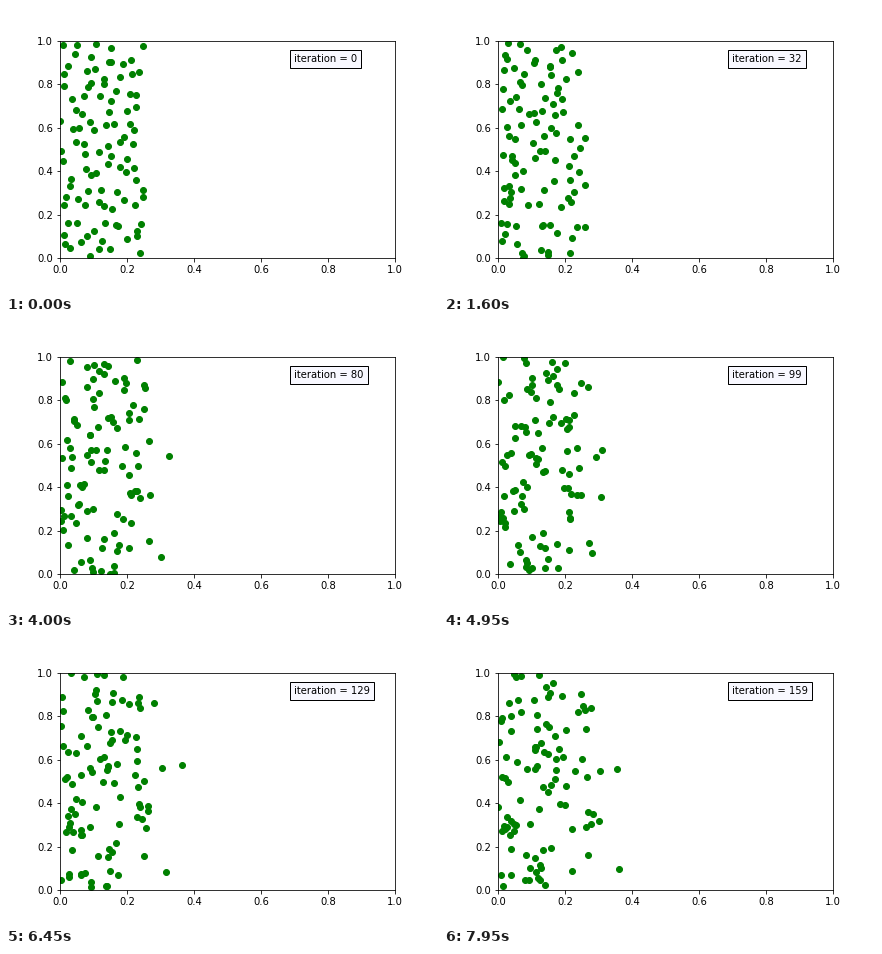
Recreate the animation shown at these times as a matplotlib script. Size 432 by 288 pixels, loop 8 s.

```python
import numpy as np
import matplotlib.pyplot as plt
from matplotlib.animation import FuncAnimation

FRAMES, INTERVAL = 160, 50
COLS, ROWS = 5, 20
START_WIDTH, REACH = 0.25, 0.385
STEP = 0.005


def fold(values, limit):
    """Reflect values back into the range 0..limit."""
    return limit - np.abs(limit - np.mod(values, 2 * limit))


def scatter_start(rng):
    """One random particle in each cell of a grid over the left strip."""
    col, row = np.meshgrid(np.arange(COLS), np.arange(ROWS))
    cells = np.stack([col.ravel(), row.ravel()], axis=1)
    cells = (cells + rng.random(cells.shape)) / (COLS, ROWS)
    return cells * (START_WIDTH, 1)


def diffuse(rng, start):
    """Random walks, shaped (frame, particle, axis)."""
    steps = rng.normal(0, STEP, (FRAMES, *start.shape))
    steps[0] = 0
    return fold(start + np.cumsum(steps, axis=0), np.array([REACH, 1]))


rng = np.random.default_rng(7)
paths = diffuse(rng, scatter_start(rng))

fig = plt.figure(figsize=(6, 4), dpi=72, facecolor="white")
fig.subplots_adjust(left=0.125, right=0.9, bottom=0.125, top=0.88)
ax = fig.add_subplot(xlim=(0, 1), ylim=(0, 1))
dots, = ax.plot([], [], "o", color="green", markersize=6)
label = ax.text(0.7, 0.9, "", fontsize=10,
                bbox=dict(facecolor="ghostwhite", edgecolor="black"))


def update(frame):
    dots.set_data(*paths[frame].T)
    label.set_text(f"iteration = {frame}")
    return dots, label


anim = FuncAnimation(fig, update, frames=FRAMES, interval=INTERVAL,
                     repeat=True, repeat_delay=0)
plt.show()
```
